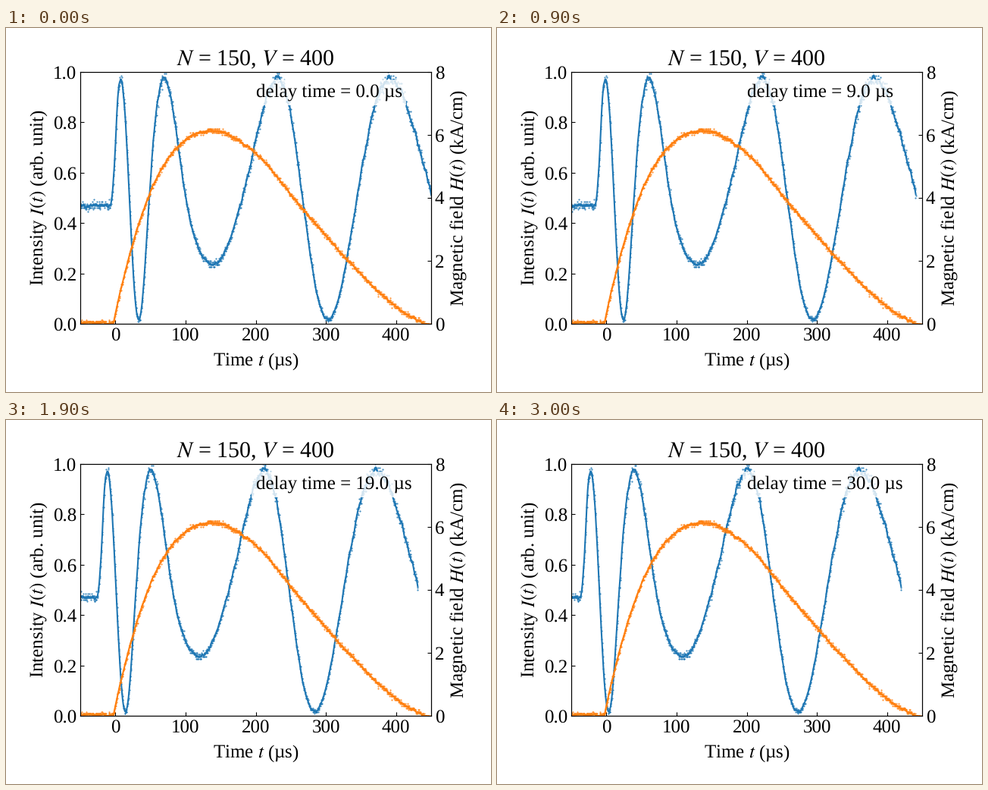
Animation of 640 by 480 pixels, one loop 3.1 s. Source, as a matplotlib script:

```python
import matplotlib.pyplot as plt
import numpy as np
from matplotlib.animation import FuncAnimation

W, H, DPI = 640, 480, 100
FRAMES, INTERVAL = 31, 100
BLUE, ORANGE = "tab:blue", "tab:orange"

plt.rcParams.update({
    "font.family": "Liberation Serif",
    "font.size": 18,
    "text.hinting": "none",
    "mathtext.fontset": "stix",
    "xtick.direction": "in",
    "ytick.direction": "in",
})


def curve(t, knots):
    """Smooth cubic through the knots, constant outside them."""
    x, y = np.array(knots, float).T
    m = np.gradient(y, x, edge_order=2)
    t = np.clip(t, x[0], x[-1])
    k = np.clip(np.searchsorted(x, t) - 1, 0, len(x) - 2)
    h = x[k + 1] - x[k]
    s = (t - x[k]) / h
    return ((1 + 2 * s) * (1 - s) ** 2 * y[k] + s * (1 - s) ** 2 * h * m[k]
            + s * s * (3 - 2 * s) * y[k + 1] + s * s * (s - 1) * h * m[k + 1])


def smooth(v, n):
    return np.convolve(np.pad(v, n // 2, mode="edge"), np.ones(n) / n, "valid")


def digitize(v, step):
    return np.round(v / step) * step


rng = np.random.default_rng(7)
t = np.arange(-50, 450.1, 0.4)

# Intensity oscillates with a phase that rises and falls with the field.
pi = np.pi
phase = curve(t, [
    (-7, -0.05), (-2, 0.25), (3.3, 1.0), (7.5, pi / 2), (20, pi),
    (33, 1.5 * pi), (48, 2 * pi), (69.5, 2.5 * pi), (98, 9.33),
    (138, 9.99), (177, 9.49), (231, 2.5 * pi), (267, 2 * pi),
    (303, 1.5 * pi), (344, pi), (391, pi / 2), (450, 0.05)])
level = 0.494 + 0.478 * np.sin(phase)
noise = rng.normal(0, 1, t.size) * (0.005 + 0.01 * level)
light_dots = digitize(level + noise, 1 / 128)
light_line = level + smooth(noise, 7)

field = 8 * curve(t, [
    (-3, 0.003), (24, 0.312), (48, 0.51), (78, 0.667), (100, 0.731),
    (136, 0.767), (197, 0.682), (269, 0.448), (328, 0.262), (383, 0.107),
    (416, 0.036), (440, 0.002), (450, -0.012)])
ripple = rng.normal(0, 0.04, t.size)
field_dots = digitize(field + ripple, 1 / 16)
field_line = field + smooth(ripple, 15)

fig = plt.figure(figsize=(W / DPI, H / DPI), dpi=DPI, facecolor="white")
ax = fig.add_axes([98.2 / W, 90 / H, 462.8 / W, 332.4 / H])
ax2 = ax.twinx()

dots = dict(ls="none", marker=".", ms=1, mew=1)
blue_dots, = ax.plot(t, light_dots, color=BLUE, **dots)
blue_line, = ax.plot(t, light_line, color=BLUE, lw=1.5)
ax2.plot(t, field_dots, color=ORANGE, **dots)
ax2.plot(t, field_line, color=ORANGE, lw=1.5)

ax.set(xlim=(-50, 450), ylim=(0, 1), xticks=range(0, 401, 100),
       title="$N$ = 150, $V$ = 400")
ax.set_xlabel("Time $t$ (µs)", labelpad=6)
ax.set_ylabel("Intensity $I(t)$ (arb. unit)", labelpad=4)
ax2.set(ylim=(0, 8), yticks=range(0, 9, 2))
ax2.set_ylabel("Magnetic field $H(t)$ (kA/cm)", labelpad=4)
label = ax.text(200, 0.9, "",
                bbox=dict(facecolor="white", edgecolor="none", alpha=0.8))


def update(i):
    delay = float(i)
    blue_dots.set_xdata(t - delay)
    blue_line.set_xdata(t - delay)
    label.set_text(f"delay time = {delay:.1f} µs")
    return blue_dots, blue_line, label


anim = FuncAnimation(fig, update, frames=FRAMES, interval=INTERVAL,
                     repeat=True, repeat_delay=0, blit=False)
plt.show()
```
